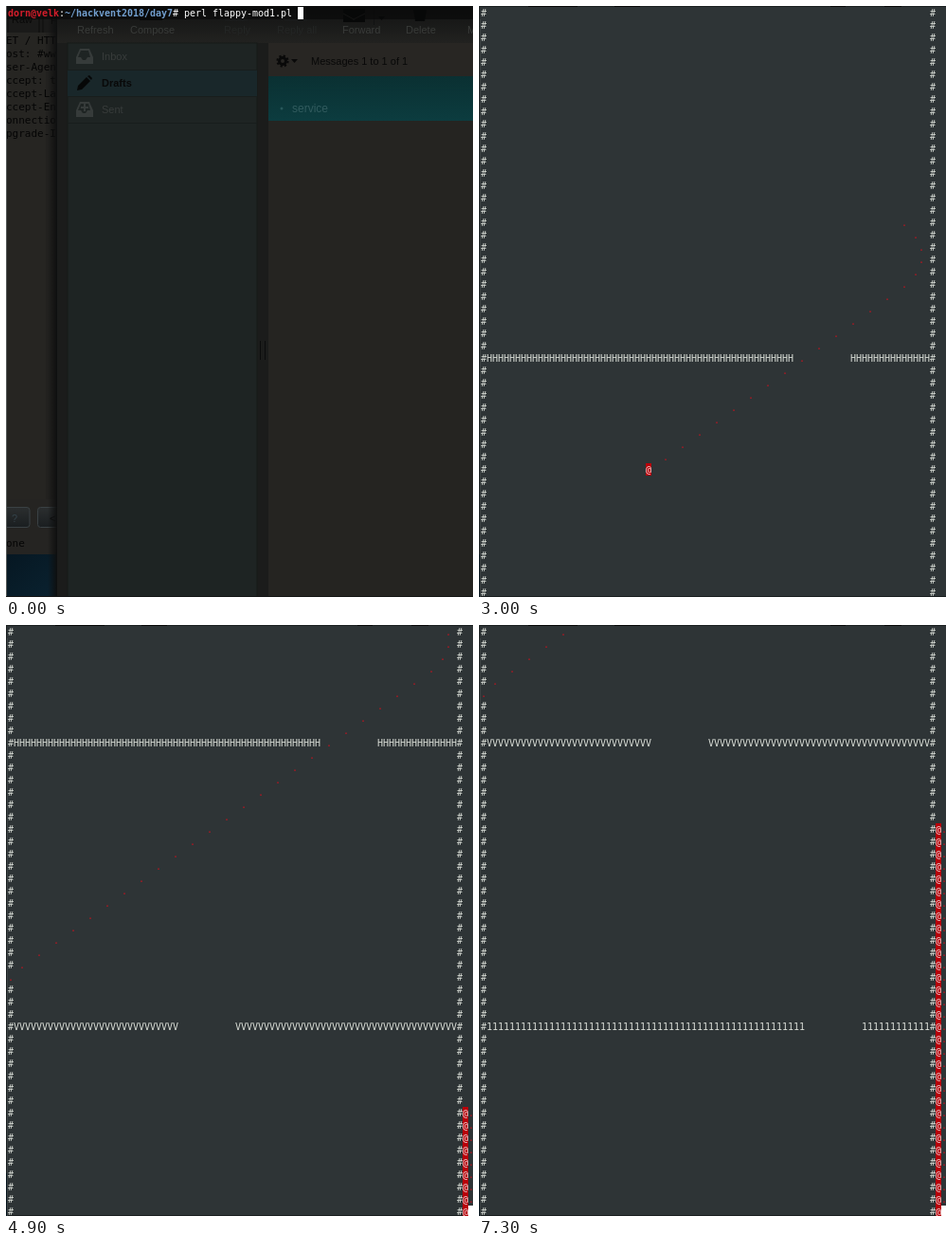
These frames come from a looping animation (493 px wide and 623 px high, 8000 ms). An HTML page:

```html
<!DOCTYPE html>
<html lang="en">
<head>
<meta charset="utf-8">
<title>Terminal game</title>
<style>
  html, body { margin: 0; width: 100%; height: 100%; overflow: hidden; background: #2e3436; }
  svg { display: block; width: 493px; height: 623px; }
  text { white-space: pre; }
  .mono { font-family: "DejaVu Sans Mono", monospace; font-size: 10px; }
  .req { font-family: "DejaVu Sans Mono", monospace; font-size: 11px; fill: #050505; }
  .ui { font-family: "Liberation Sans", Arial, sans-serif; font-size: 11px; }
</style>
</head>
<body>
<svg viewBox="0 0 493 623" xmlns="http://www.w3.org/2000/svg">
  <defs>
    <linearGradient id="bar" x2="0" y2="1">
      <stop offset="0" stop-color="#111212"/><stop offset="1" stop-color="#222220"/>
    </linearGradient>
    <linearGradient id="desk" x2="1" y2="1">
      <stop offset="0" stop-color="#061722"/><stop offset="1" stop-color="#0a2230"/>
    </linearGradient>
    <linearGradient id="pick" x2="0" y2="1">
      <stop offset="0" stop-color="#0a3032"/><stop offset="1" stop-color="#0c3c3f"/>
    </linearGradient>
    <linearGradient id="shade">
      <stop offset="0" stop-color="#0e0f0f" stop-opacity="0"/><stop offset="1" stop-color="#0e0f0f"/>
    </linearGradient>
    <linearGradient id="btn" x2="0" y2="1">
      <stop offset="0" stop-color="#2b2e2f"/><stop offset="1" stop-color="#1a1e20"/>
    </linearGradient>
  </defs>
  <g id="desktop"></g>
  <g id="game"></g>
  <g id="term" class="mono"></g>
</svg>
<script>
const LOOP = 8000, TICK = 100, LAST = 73;
const CW = 6, CH = 13, ROWS = 48, WALL = 79, BIRD_ROW = 37;
const LIGHT = '#d9ddd6', RED = '#b8000a', TRAIL = '#c01420';
const HOLDS = [9, 20, 26, 37, 51, 59, 61, 67];   // ticks without a redraw
const DOUBLES = [25, 36, 50, 60, 66];            // ticks that scroll two rows
const WALLS = [['H', 55], ['V', 30], ['1', 57]]; // glyph and first gap column
const GAP = 10, FIRST_WALL = 48, WALL_EVERY = 23, FALL_OUT = 31;

const $ = id => document.getElementById(id);
const px = col => 2 + col * CW;
const py = row => 1 + row * CH;
const rect = (x, y, w, h, fill, more = '') =>
  `<rect x="${x}" y="${y}" width="${w}" height="${h}" fill="${fill}" ${more}/>`;
const path = (d, fill, more = '') => `<path d="${d}" fill="${fill}" ${more}/>`;
const label = (s, x, y, fill, more = 'class="ui"') =>
  `<text x="${x}" y="${y}" fill="${fill}" ${more}>${s.replace(/</g, '&lt;')}</text>`;
const cells = (s, col, row, fill = LIGHT, more = '') =>
  label(s, [...s].map((_, i) => px(col + i)).join(' '), py(row) + 10, fill, more);
const block = (col, row, fill) => rect(px(col), py(row), CW, CH, fill);

// Bird column after each scroll: rises, then falls at a limited speed.
const flight = [74];
for (let v = 2; flight.length < FALL_OUT; v = Math.max(v - 1, -3)) {
  flight.push(Math.max(0, flight.at(-1) + v));
}

function scrollAt(tick) {
  let n = 0;
  for (let k = 9; k <= tick; k++) n += HOLDS.includes(k) ? 0 : DOUBLES.includes(k) ? 2 : 1;
  return n;
}

function drawDesktop() {
  const ink = '#090909', dim = '#383c3b';
  let s = rect(0, 0, 493, 623, '#242321') + rect(0, 0, 54, 28, '#1a1a19') +
    rect(0, 28, 42, 492, '#262522') + rect(42, 28, 12, 492, '#22211f') +
    rect(0, 520, 54, 58, '#252422') + rect(0, 578, 54, 45, 'url(#desk)');
  s += path('M2 28V8H35V28M39 28V10H54', 'none', 'stroke="#0c0c0c"');
  s += label('Raw', 6, 18, ink) + label('H', 47, 19, ink);
  ['ET / HTT', 'ost: #ww', 'ser-Agen', 'ccept: t', 'ccept-La', 'ccept-En', 'onnectio', 'pgrade-I']
    .forEach((line, i) => s += label(line, 0, 40 + i * 14, ink, 'class="req"'));
  s += rect(-8, 528.5, 33, 21, 'url(#btn)', 'rx="3" stroke="#3a4144"') +
    rect(33.5, 528.5, 34, 21, 'url(#btn)', 'rx="3" stroke="#3a4144"');
  s += label('?', 6, 544, '#34434a') + label('<', 46, 544, ink) +
    label('one', 0, 570, ink, 'class="req"');

  s += rect(44, 0, 10, 623, 'url(#shade)') + rect(54, 0, 439, 623, '#1b1c1b') +
    rect(54, 0, 439, 39, 'url(#bar)');
  s += rect(65, 39, 200, 584, '#1e2423', 'stroke="#171a19"') + rect(65, 67, 200, 28, '#19272a');
  for (const y of [67, 95, 123]) s += rect(65, y, 200, 1, '#181d1c');
  s += rect(277, 39, 216, 584, '#252421') + rect(277, 39, 216, 35, '#282623') +
    rect(277, 74, 216, 47, 'url(#pick)');
  s += rect(268, 353, 1, 20, '#0b0c0c') + rect(273, 353, 1, 20, '#0b0c0c');

  [['Refresh', 75, 0], ['Compose', 131, 0], ['Reply', 230, 1], ['Reply all', 286, 1],
   ['Forward', 355, 0], ['Delete', 422, 0], ['M', 487, 0]]
    .forEach(([t, x, off]) => s += label(t, x, 29, off ? '#242625' : '#393b39'));
  s += rect(141, 4, 24, 11, '#070808') + rect(86, 6, 12, 8, '#0c0d0d') +
    rect(231, 8, 24, 8, '#191a1a') + rect(294, 8, 24, 8, '#191a1a') +
    path('M356 3H379V17H356ZM393 11h7l-3.5 4z', '#070808') +
    path('M356 8l11 6l12-6', 'none', 'stroke="#292a29"') +
    rect(388, 2, 1, 18, '#111212') + path('M430 4H444L442 16H432Z', '#070808');

  const tray = y => path(`M78 ${y}H88L92 ${y + 9}V${y + 16}H74V${y + 9}Z`, '#363b3a') +
    path(`M79 ${y + 2}H87L89 ${y + 9}H86L84 ${y + 12}H81L79 ${y + 9}H76Z`, '#1e2423');
  s += tray(45) + tray(101) + path('M82 103h2v3h3v2h-3v3h-2v-3h-3v-2h3z', '#363b3a');
  s += path('M75 89l1-5l9-9l4 4l-9 9zM86 74l2-1l3 3l-1 2z', '#060707');
  s += label('Inbox', 101, 57, dim) + label('Drafts', 101, 85, ink, 'class="ui" font-weight="700"') +
    label('Sent', 101, 113, dim);
  s += '<circle cx="292" cy="58" r="3.5" fill="none" stroke="#090909" stroke-width="3"/>' +
    '<circle cx="292" cy="58" r="5.6" fill="none" stroke="#090909" stroke-width="2" stroke-dasharray="2.2 2.2"/>';
  s += path('M301 56h7l-3.5 4z', ink) + label('Messages 1 to 1 of 1', 322, 62, ink);
  s += '<circle cx="291" cy="108" r="1.5" fill="#27575a"/>' +
    label('service', 302, 112, '#315b5e', 'class="ui" style="font-size:12px"');
  return s + rect(0, 0, 493, 14, '#080909', 'opacity=".65"') +
    rect(0, 0, 1, 623, '#565a59') + rect(0, 622, 493, 1, '#151616');
}

function drawBackdrop() {
  let s = rect(0, 0, 493, 623, '#2e3436') + rect(0, 0, 493, 1, '#1a1f20') +
    rect(0, 622, 493, 1, '#1a1f20') + rect(0, 0, 1, 578, '#1b2021') + rect(0, 578, 1, 45, '#07151d');
  for (const [x, w] of [[52, 52], [143, 27], [371, 16], [428, 18]]) s += rect(x, 0, w, 1, '#060707');
  return s + rect(1, 14, 1, 609, '#3c4243');
}

function drawPrompt(tick) {
  const bold = 'font-weight="700"';
  return cells('dorn@velk', 0, 0, '#d51d2b', bold) + cells(':', 9, 0, '#fff') +
    cells('~/hackvent2018/day7', 10, 0, '#729fcf', bold) +
    cells('# perl flappy-mod1.pl', 29, 0, '#fff') + (tick < 4 ? block(51, 0, '#fff') : '');
}

function drawGame(tick) {
  const n = scrollAt(tick), out = n >= FALL_OUT;
  const shown = HOLDS.includes(tick) ? tick - 1 : tick;
  const cursorOn = Math.floor((shown - 8) / 6) % 2 === 0;
  let s = '';
  for (let row = 0; row < ROWS; row++) {
    const step = n - BIRD_ROW + row;      // when the bird was on this row
    const col = step >= 0 && step < n ? flight[step] : undefined;
    if (col !== 0) s += cells('#', 0, row);
    s += cells('#', WALL, row);
    if (col !== undefined) s += cells('.', col, row, TRAIL);
    const spill = n - (ROWS - 1) + row;
    if (spill >= FALL_OUT) {
      s += block(WALL + 1, row, RED) + cells('@', WALL + 1, row, '#f0d8d6');
      if (row < ROWS - 1) s += cells('.', WALL + 2, row, TRAIL);
    }
  }
  WALLS.forEach(([ch, gap], i) => {
    const row = FIRST_WALL + i * WALL_EVERY - n;
    if (row < 0 || row >= ROWS) return;
    s += cells(ch.repeat(gap - 1), 1, row) +
      cells(ch.repeat(WALL - gap - GAP), gap + GAP, row);
  });
  if (n > 0 && !out) s += block(flight[n], BIRD_ROW, RED) + cells('@', flight[n], BIRD_ROW, '#f0d8d6');
  if (cursorOn) {
    if (n === 0) s += block(WALL + 1, ROWS - 1, '#fff');
    else if (out) s += block(WALL + 2, ROWS - 1, '#fff');
    else s += block(flight[n] + 1, BIRD_ROW, '#e0e3dc');
  }
  return s;
}

$('desktop').innerHTML = drawDesktop();
$('game').innerHTML = drawBackdrop();

let drawn = -1;
function render(ms) {
  const tick = Math.min(LAST, Math.floor((ms % LOOP) / TICK));
  if (tick !== drawn) {
    drawn = tick;
    const playing = tick >= 8;
    $('game').style.display = playing ? '' : 'none';
    // the first screen stays empty until the next redraw
    $('term').innerHTML = playing ? drawGame(tick) : drawPrompt(tick);
  }
}

const start = performance.now();
function frame() {
  render(performance.now() - start);
  requestAnimationFrame(frame);
}
frame();
</script>
</body>
</html>
```
